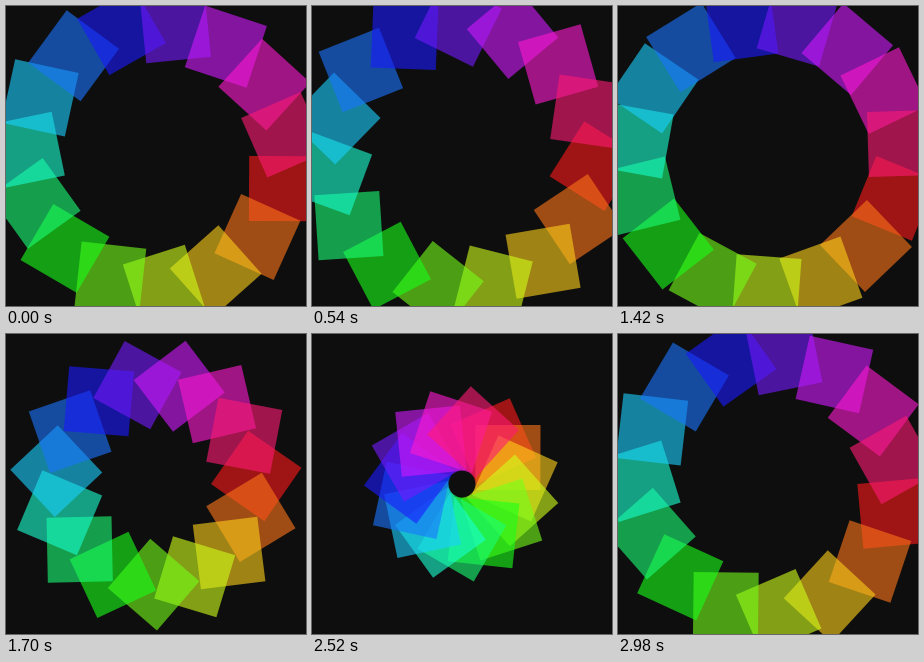
Animation of 300 by 300 pixels, one loop 3 s. Source, as an HTML page:

```html
<!DOCTYPE html>
<html lang="en">
<head>
<meta charset="utf-8">
<title>Colour ring</title>
<style>
  @property --phase {
    syntax: "<angle>";
    inherits: true;
    initial-value: 0deg;
  }
  html, body {
    margin: 0;
    width: 100%;
    height: 100%;
    overflow: hidden;
    background: #0e0e0e;
  }
  .ring {
    position: absolute;
    left: 150px;
    top: 150px;
    animation: cycle 3s linear infinite;
  }
  /* Each square hangs by its top left corner on its own spoke. */
  .ring i {
    --swing: sin(var(--phase));
    position: absolute;
    width: 65px;
    height: 65px;
    background: hsl(calc(var(--i) * 24) 100% 55% / .6);
    transform-origin: 0 0;
    transform:
      rotate(calc(var(--i) * 24deg))
      translateX(calc(93px * (1 + var(--swing))))
      rotate(calc(135deg * var(--swing)));
  }
  @keyframes cycle {
    from { --phase: 0deg; }
    to { --phase: 360deg; }
  }
</style>
</head>
<body>
<div class="ring">
  <i style="--i:0"></i>
  <i style="--i:1"></i>
  <i style="--i:2"></i>
  <i style="--i:3"></i>
  <i style="--i:4"></i>
  <i style="--i:5"></i>
  <i style="--i:6"></i>
  <i style="--i:7"></i>
  <i style="--i:8"></i>
  <i style="--i:9"></i>
  <i style="--i:10"></i>
  <i style="--i:11"></i>
  <i style="--i:12"></i>
  <i style="--i:13"></i>
  <i style="--i:14"></i>
</div>
</body>
</html>
```
